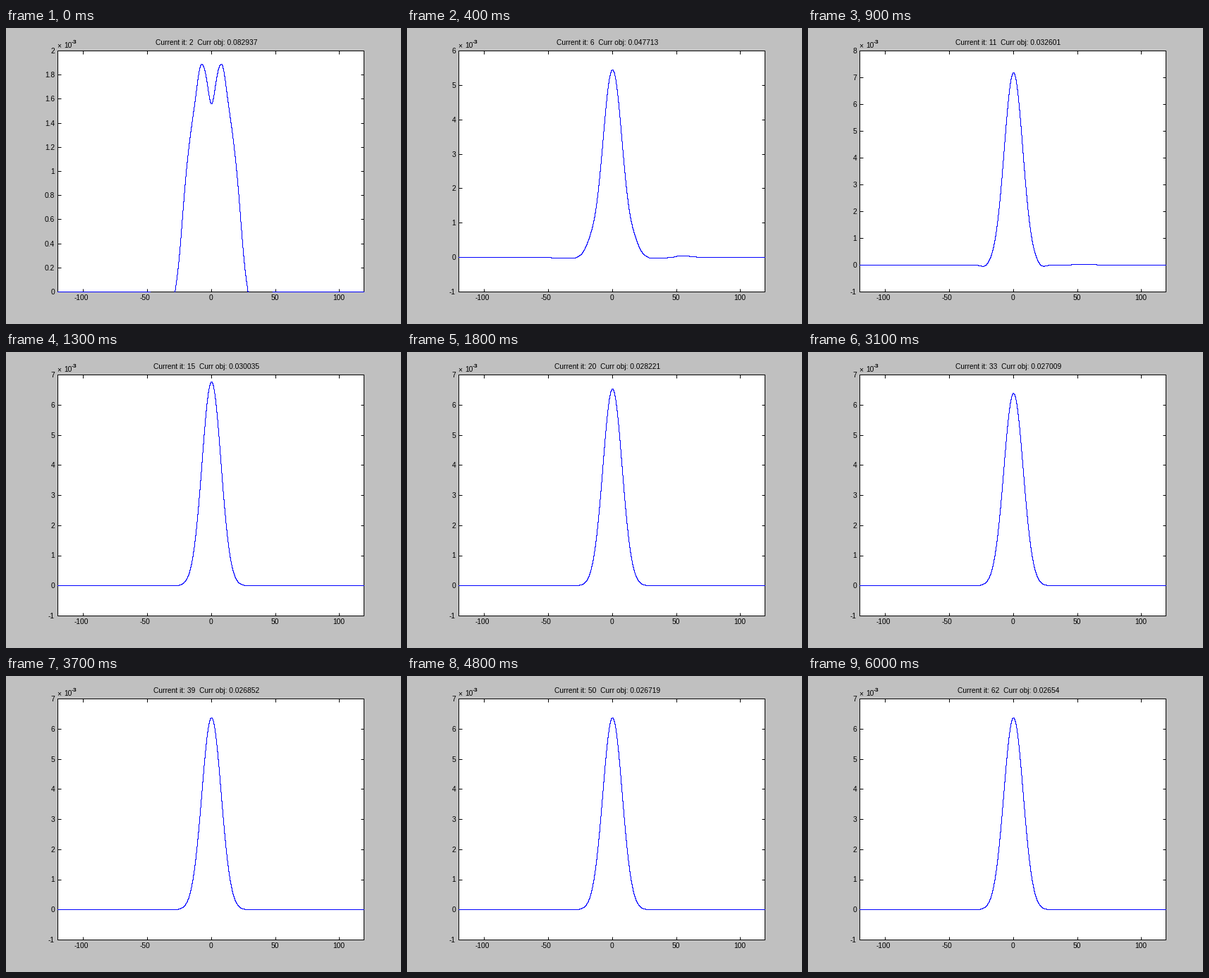
Recreate the animation shown at these times as a matplotlib script. Size 560 by 420 pixels, loop 6.2 s.

```python
import numpy as np
import matplotlib.pyplot as plt
from matplotlib.animation import FuncAnimation

W, H, DPI = 560, 420, 100
PT = 72 / DPI  # points per pixel
LEFT, RIGHT, TOP, BOTTOM = 73, 507, 32, 374
X_MIN, X_MAX = -120, 119
FRAMES, INTERVAL, LAST_IT = 62, 100, 62

plt.rcParams.update({
    "font.family": "Liberation Sans",
    "font.size": 10.2 * PT,
    "axes.unicode_minus": False,
    "path.simplify": False,
})

# Dense samples, so the snapped curve advances pixel by pixel.
x = np.linspace(X_MIN, X_MAX, (X_MAX - X_MIN) * 30 + 1)
r = np.abs(x)

# Key values of the objective; it decays exponentially between them.
OBJECTIVE = {2: .082937, 11: .032601, 20: .028221, 27: .027204,
             39: .026852, 50: .026719, 62: .02654}
OBJ_FLOOR = .0262


def gauss(u, sigma):
    return np.exp(-u ** 2 / (2 * sigma ** 2))


def first_estimate():
    """Parabolic mound with soft edges and a dent in its top, in 1e-3."""
    mound = np.maximum(1.96 * (1 - (r / 28.5) ** 2), -.04) * (r < 48)
    mound *= 1 - .45 * gauss(r - 28, 3.5)
    return mound + .1 * gauss(r - 9, 2.2) - .4 * gauss(x, 2.9) * (r < 28)


START = first_estimate()


def estimate(it):
    """Blend from the first mound to a bell that settles, with a brief ripple."""
    mix = min(1, (it - 2) / 7)
    settle = np.exp(-.18 * (it - 11))
    bell = (6.37 + .81 * settle) * gauss(x, 7.55 - .35 * settle)
    ripple = .4 * gauss(x - 55, 7) - gauss(r - 22, 3)
    swing = .35 * mix * gauss(it - 8, 1.8)
    return (1 - mix) * START + mix * bell + swing * ripple


def objective(it):
    excess = np.array(list(OBJECTIVE.values())) - OBJ_FLOOR
    return OBJ_FLOOR + np.exp(np.interp(it, list(OBJECTIVE), np.log(excess)))


def y_ticks(it, peak):
    step = .2 if peak <= 2 else .5 if peak <= 4 else 1
    low = -1 if it > 2 else 0
    return np.round(np.arange(low, np.ceil(peak / step) + 1) * step, 1) + 0.0


fig = plt.figure(figsize=(W / DPI, H / DPI), dpi=DPI, facecolor="#c0c0c0")
ax = fig.add_axes([LEFT / W, 1 - BOTTOM / H, (RIGHT - LEFT) / W, (BOTTOM - TOP) / H])
ax.set_xlim(X_MIN, X_MAX)
x_ticks = [-100, -50, 0, 50, 100]
ax.set_xticks(x_ticks, labels=[])
ax.tick_params(direction="in", top=True, right=True, length=4.5 * PT,
               width=PT, pad=4 * PT)
for spine in ax.spines.values():
    spine.set_linewidth(PT)


def label(px, py, text, **style):
    return fig.text(px / W, 1 - py / H, text, **style)


for tick in x_ticks:
    px = LEFT + (tick - X_MIN) / (X_MAX - X_MIN) * (RIGHT - LEFT)
    label(px - (3 if tick < 0 else .5), 386, str(tick), ha="center")

label(72, 28, "×")
label(82, 28, "10")
label(93, 22.5, "-3", size=8.5 * PT, weight="bold")
title = label(284, 24.5, "", ha="center")

curve, = ax.plot(x, START, color="#0000ff", lw=PT, snap=True,
                 clip_on=False, zorder=5)


def update(frame):
    it = min(frame + 2, LAST_IT)
    values = estimate(it)
    ticks = y_ticks(it, values.max())
    curve.set_ydata(np.where(values < ticks[0], np.nan, values))
    ax.set_ylim(ticks[0], ticks[-1])
    ax.set_yticks(ticks, labels=[f"{t:g}" for t in ticks])
    title.set_text(f"Current it: {it}  Curr obj: {objective(it):.5g}")
    return curve, title


anim = FuncAnimation(fig, update, frames=FRAMES, interval=INTERVAL,
                     repeat=True, repeat_delay=0, blit=False)
plt.show()
```
